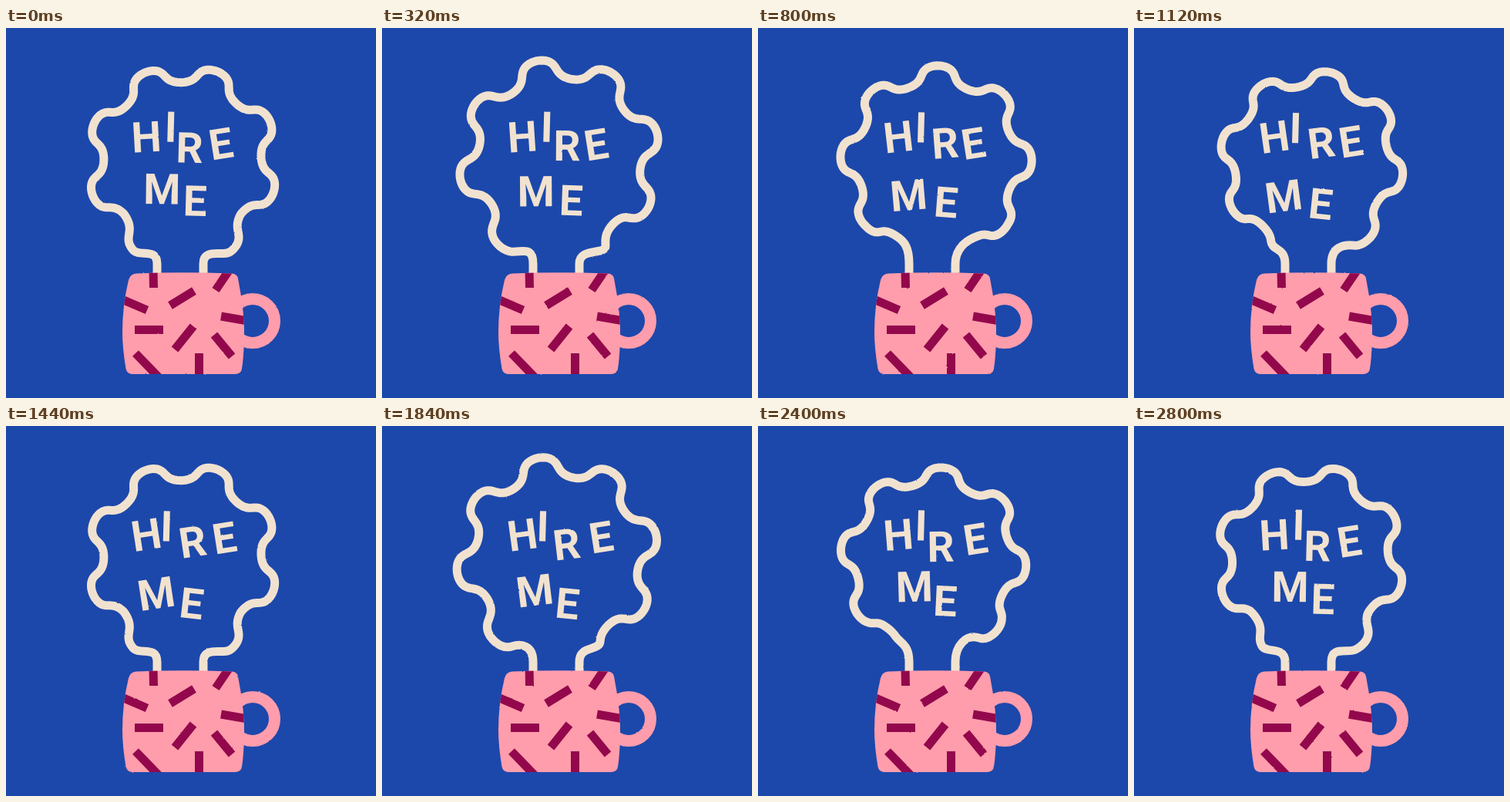
Write an HTML page that moves like this. It is 480 px wide and 480 px high and loops after 2.88 s.

```html
<!DOCTYPE html>
<html lang="en">
<head>
<meta charset="utf-8">
<title>Hire me</title>
<style>
  html, body { margin: 0; width: 100%; height: 100%; overflow: hidden; background: #1c48ab; }
  svg { display: block; width: 100vw; height: 100vh; }
  text { font: 700 55px Roboto, "Open Sans", sans-serif; text-anchor: middle; fill: #f1e2d0; }
</style>
</head>
<body>
<svg viewBox="0 0 480 480">
  <defs>
    <filter id="grain" filterUnits="userSpaceOnUse" x="0" y="0" width="480" height="480" color-interpolation-filters="sRGB">
      <feTurbulence id="noise" type="fractalNoise" baseFrequency=".25" numOctaves="2" result="n"/>
      <feDisplacementMap in="SourceGraphic" in2="n" scale="1.6" xChannelSelector="R" yChannelSelector="G"/>
    </filter>
    <path id="body" d="M169 318.500Q230 316 293 318.500Q300 319 301 325Q310 370 309 405Q308 430 306 442Q305 449 297 449H164Q157 449 155.500 442Q151 415 151 395Q151 360 159 327Q161 319 169 318.500Z"/>
    <clipPath id="clip"><use href="#body"/></clipPath>
  </defs>
  <rect width="480" height="480" fill="#1c48ab"/>
  <g filter="url(#grain)">
    <path id="steam" fill="none" stroke="#f1e2d0" stroke-width="11" stroke-linejoin="round"/>
    <g id="words"></g>
    <circle cx="320" cy="380" r="28.500" fill="none" stroke="#ff9dac" stroke-width="15"/>
    <use href="#body" fill="#ff9dac"/>
    <path clip-path="url(#clip)" fill="none" stroke="#93084c" stroke-width="11"
      d="M191 312L191.500 337M213 360L244 341M272 340L291 312M148 351L183 366M167 391.500H204M168 422L198 453M219 417L243 387M250.500 422V455M270 398L293 426M279 374L314 380"/>
  </g>
</svg>
<script>
const $ = id => document.getElementById(id);
const { sin, cos, PI, floor, abs, max, min, hypot } = Math;
const STEP = 80, COUNT = 36, TAU = 2 * PI;
const LOBE = 44;   // degrees between two lobes
const EDGE = 152;  // degrees from the top at which the necks begin

// Each letter swings around its place: home, reach, lag of the swing.
function letter(char, x, y, turn, dx, dy, dTurn, lag) {
  const el = document.createElementNS("http://www.w3.org/2000/svg", "text");
  el.textContent = char;
  el.setAttribute("y", 19.6);
  $("words").append(el);
  return a => {
    const s = cos(a - lag);
    el.setAttribute("transform",
      `translate(${x + dx * s} ${y + dy * s}) rotate(${turn + dTurn * cos(a)})`);
  };
}

const letters = [
  letter("H", 182, 141, -6, 0, 0, 2.8, 0),
  letter("I", 211, 129, 1.5, 2.9, -1, 0, .35),
  letter("R", 240, 152.5, -3.5, -3, 3.9, 5, -.87),
  letter("E", 281, 147.5, -9, -3.2, 3.6, 0, .79),
  letter("M", 198.5, 213, -4, 4.6, -5.2, 4.7, -.61),
  letter("E", 243, 227, 4, 2.5, -3.5, -2.5, .52)
];

// A wavy ring, open at the bottom, whose lobes drift clockwise and breathe.
function cloud(loop) {
  const drift = 2 * loop;
  const breath = cos(TAU * (drift - .27));
  const cx = 229 + 2 * sin(TAU * loop), cy = 172.5 - 2 * breath;
  const mid = 114 + 4.5 * breath, depth = 11.5 + 1.5 * breath;

  const at = deg => {
    const wave = TAU * ((deg + 23) / LOBE - drift);
    const lift = 8 * max(0, min(1, (abs(deg) - 132) / 20));
    const r = mid + depth * cos(wave) + lift;
    const a = (deg + 1.7 * sin(2 * wave)) * PI / 180;  // plump tips, steep flanks
    return [cx + r * sin(a), cy - r * cos(a)];
  };
  // Control point that leaves the ring along its own direction.
  const leave = side => {
    const [x, y] = at(side * EDGE), [px, py] = at(side * (EDGE - 1));
    const k = 13 / hypot(x - px, y - py);
    return [x + (x - px) * k, y + (y - py) * k];
  };

  const ring = [];
  for (let deg = -EDGE; deg <= EDGE; deg++) ring.push(at(deg).map(v => v.toFixed(2)));
  return `M196 322V306C196 284 ${leave(-1)} ${ring[0]}L${ring.join(" ")}` +
    `C${leave(1)} 256 284 256 306V322`;
}

function draw(ms) {
  const frame = floor(ms / STEP) % COUNT;
  const loop = frame / COUNT;
  $("steam").setAttribute("d", cloud(loop));
  letters.forEach(move => move(TAU * loop));
  $("noise").setAttribute("seed", frame + 1);
}

const start = performance.now();
function tick() {
  draw(performance.now() - start);
  requestAnimationFrame(tick);
}
tick();
</script>
</body>
</html>
```
